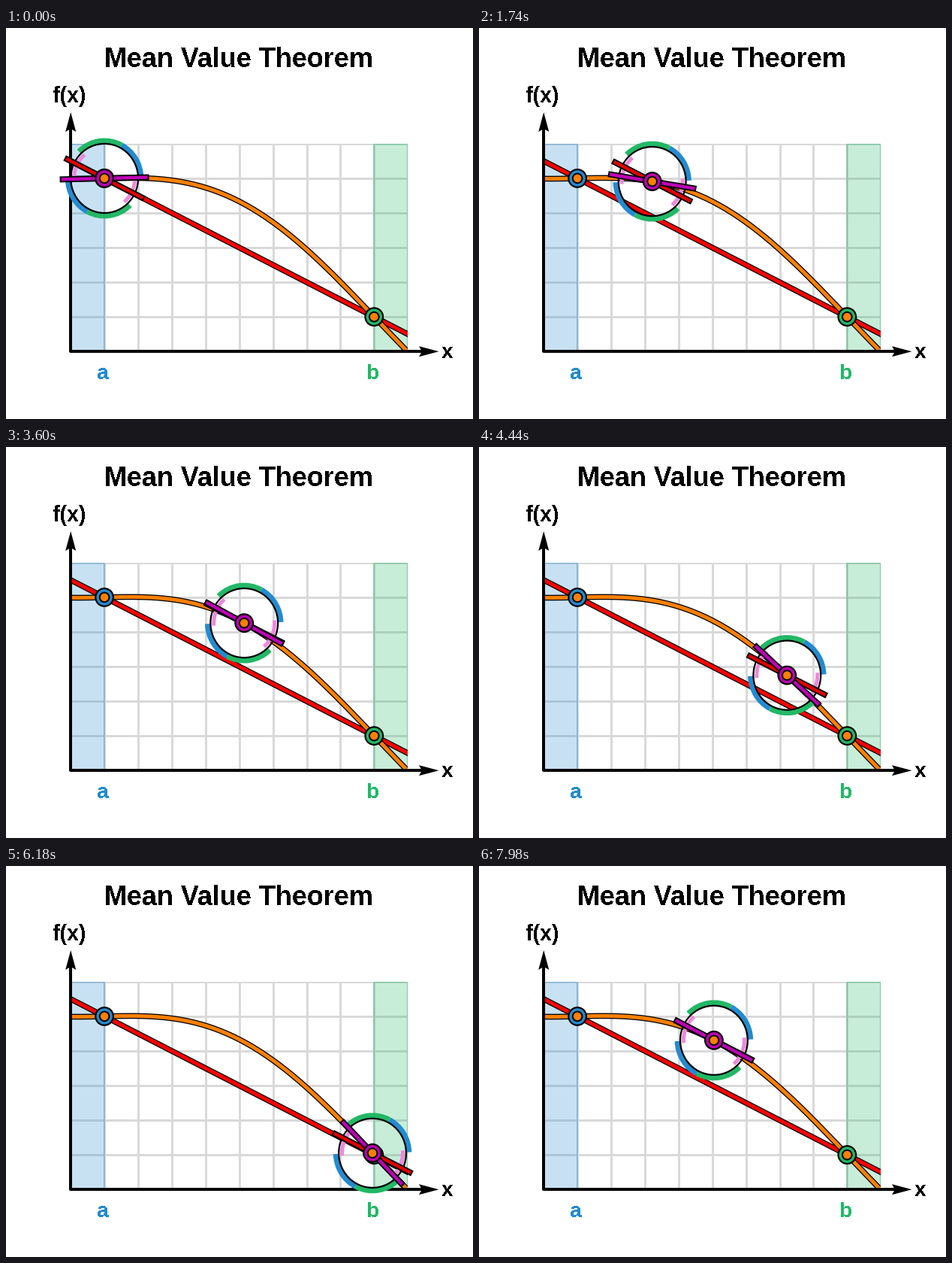
Recreate the animation shown at these times as a matplotlib script. Size 622 by 520 pixels, loop 8000 ms.

```python
import numpy as np
import matplotlib.pyplot as plt
from matplotlib.animation import FuncAnimation
from matplotlib.patches import Arc, Circle, Ellipse, Polygon, Rectangle

W, H, DPI = 622, 520, 100
PT = 72 / DPI
TICK, LOOP = 20, 8000
START, STEP, LEG, MOVES = 780, 60, 45, 32
A, B, C = 1.0, 9.0, 5.0
BLUE, GREEN, PURPLE = "#238bd0", "#22b866", "#be00b6"
ORANGE, RED, PINK = "#ff8000", "#ff0000", "#ee88dd"
X0, Y0, UX, UY = 86.2, 430.2, 44.9, 46.05

plt.rcParams["font.family"] = "Liberation Sans"
fig = plt.figure(figsize=(W / DPI, H / DPI), dpi=DPI, facecolor="white")
ax = fig.add_axes([0, 0, 1, 1])
ax.set_xlim(0, W)
ax.set_ylim(H, 0)
ax.axis("off")


def px(u):
    return X0 + UX * u


def py(v):
    return Y0 - UY * v


# The curve is the secant plus half a sine wave between a and b
AMP, FREQ = 4 / 3, np.pi / (B - A)


def secant(u):
    return 5.5 - u / 2


def f(u):
    return secant(u) + AMP * np.sin(FREQ * (u - A))


def df(u):
    return -0.5 + AMP * FREQ * np.cos(FREQ * (u - A))


def angle(slope):
    return np.degrees(np.arctan2(slope * UY, UX))


def line(xs, ys, width, color, z):
    return ax.plot(xs, ys, color=color, lw=width * PT, zorder=z,
                   solid_capstyle="butt")[0]


def label(x, y, s, size, color="black"):
    return ax.text(x, y, s, size=size * PT, color=color, weight="bold",
                   ha="center", va="baseline", zorder=6, antialiased=False)


def ring(color, z):
    outer = Circle((0, 0), 11.8, fc=color, ec="black", lw=2.2 * PT, zorder=z)
    inner = Circle((0, 0), 6.3, fc=ORANGE, ec="black", lw=2 * PT, zorder=z + 0.1)
    return [ax.add_patch(outer), ax.add_patch(inner)]


def place(parts, x, y):
    for part in parts:
        part.set_center((x, y))


frame = Rectangle((px(0), py(6)), 10 * UX, 6 * UY, transform=ax.transData)

# Grid and end bands
gx, gy = [], []
for i in range(1, 11):
    gx += [px(i), px(i), np.nan]
    gy += [py(0), py(6), np.nan]
for j in range(1, 7):
    gx += [px(0), px(10), np.nan]
    gy += [py(j), py(j), np.nan]
line(gx, gy, 3, "#d9d9d9", 1).set_clip_path(frame)
for left, color in ((0, BLUE), (9, GREEN)):
    box = (px(left), py(6)), UX, 6 * UY
    ax.add_patch(Rectangle(*box, fc=color, ec="none", alpha=0.25, zorder=1.5))
    edge = Rectangle(*box, fc="none", ec=color, lw=2 * PT, alpha=0.35, zorder=1.6)
    ax.add_patch(edge).set_clip_path(frame)

# Secant and curve
us = np.linspace(0, 10.1, 160)
for ys, color, z in ((secant(us), RED, 2), (f(us), ORANGE, 3)):
    for width, tint in ((7.6, "black"), (5, color)):
        line(px(us), py(ys), width, tint, z).set_clip_path(frame)
        z += 0.1

# Axes
line([X0, X0, 555], [132, Y0, Y0], 4, "black", 4)
ax.add_patch(Polygon([(X0, 112), (X0 + 7, 138), (X0, 134), (X0 - 7, 138)],
                     fc="black", ec="none", zorder=4))
ax.add_patch(Polygon([(576.5, Y0), (550, Y0 + 7), (554, Y0), (550, Y0 - 7)],
                     fc="black", ec="none", zorder=4))

label(310, 51.5, "Mean Value Theorem", 36)
label(84.7, 99, "f(x)", 28.5)
label(588, 439, "x", 28)
label(129.3, 467, "a", 28, BLUE)
label(489, 467, "b", 28, GREEN)
mark = label(px(C), 482, "c", 28, PURPLE)

place(ring(BLUE, 5), px(A), py(f(A)))
place(ring(GREEN, 5), px(B), py(f(B)))

# Moving dial: the gap in the outer arcs spans every slope between a and b
HI, LO, NORMAL = angle(df(A)), angle(df(B)), angle(-0.5) + 90
dial = []


def size(r):
    return 2 * r * UX / UY, 2 * r


def arc(r, width, color, start, end, cap="butt"):
    part = Arc((0, 0), *size(r), theta1=-end, theta2=-start, color=color,
               lw=width * PT, zorder=7, capstyle=cap)
    dial.append(ax.add_patch(part))


for turn in (0, 180):
    arc(50, 7, BLUE, HI + turn, NORMAL + turn)
    arc(50, 7, GREEN, NORMAL + turn, 180 + LO + turn)
    arc(41.5, 5, PINK, LO + turn, HI + turn, "projecting")
dial.append(ax.add_patch(Ellipse((0, 0), *size(UY), fill=False, ec="black",
                                 lw=2.2 * PT, zorder=7.2)))


def bar(color, z):
    return line([], [], 8, "black", z), line([], [], 4.4, color, z + 0.1)


chord = bar("#e00000", 8)
tangent = bar(PURPLE, 8.5)
dial += ring(PURPLE, 9)


def aim(parts, x, y, slope):
    d = np.array([UX, -slope * UY])
    d /= np.hypot(*d)
    for part, half in zip(parts, (59.5, 57.6)):
        part.set_data([x - half * d[0], x + half * d[0]],
                      [y - half * d[1], y + half * d[1]])


def ease(k):
    if k >= MOVES:
        return 1.0
    t = (k + 1.8) / (MOVES + 3.6)
    return 2 * t * t if t < 0.5 else 1 - 2 * (1 - t) ** 2


def position(ms):
    if ms < START:
        return A
    leg, k = divmod((ms - START) // STEP, LEG)
    begin, end = ((A, C), (C, B), (B, C))[leg]
    return begin + (end - begin) * ease(k + 1)


def draw(n):
    u = position(n * TICK)
    x, y = px(u), py(f(u))
    place(dial, x, y)
    aim(chord, x, y, -0.5)
    aim(tangent, x, y, df(u))
    mark.set_visible(u == C)
    return [*dial, *chord, *tangent, mark]


anim = FuncAnimation(fig, draw, frames=LOOP // TICK, interval=TICK,
                     repeat=True, repeat_delay=0, blit=False)
plt.show()
```
